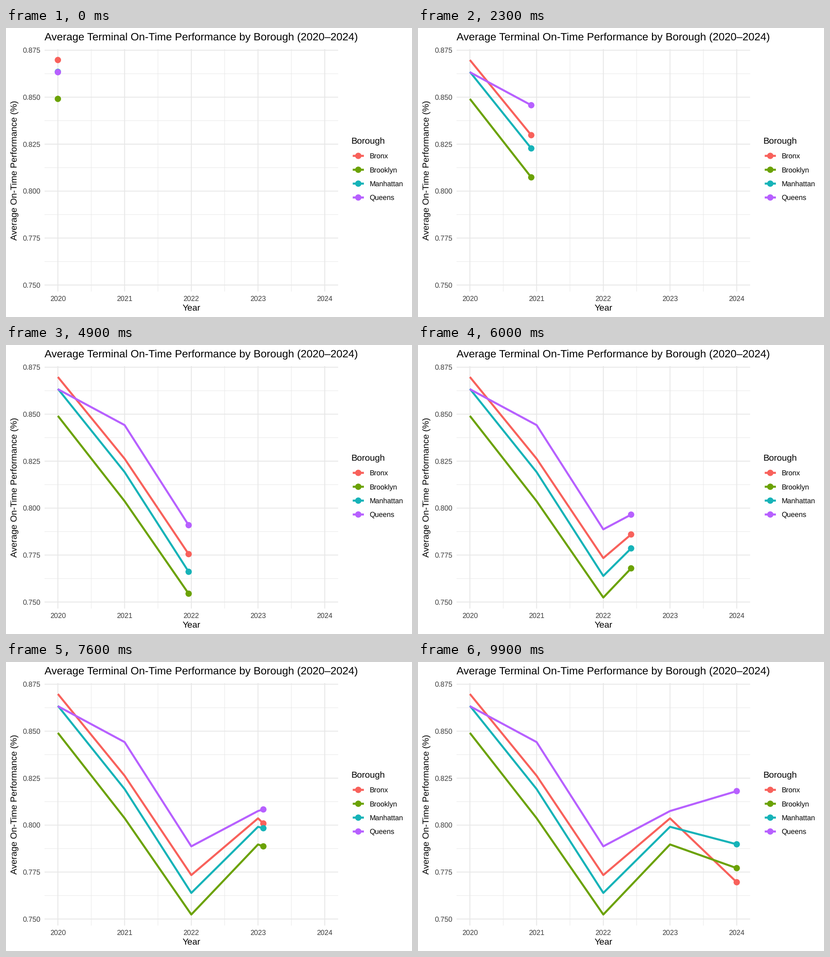
A matplotlib script for the animation above (10000 ms loop, 885 px wide and 632 px high).

```python
import numpy as np
import matplotlib.pyplot as plt
from matplotlib.animation import FuncAnimation
from matplotlib.patches import Circle

W, H, DPI = 885, 632, 100
FRAMES, INTERVAL = 100, 100
PX = 72 / DPI  # points per pixel
BASE = 14      # base font size in points
LINE, RADIUS = 4.4, 6.9

plt.rcParams.update({
    "font.family": "Liberation Sans",
    "text.hinting": "none",
    "path.snap": False,
})

YEARS = np.arange(2020, 2025)
KEYS = [0, 25, 50, 74, 99]  # frame at which each year is reached
LEFT, RIGHT, TOP, BOTTOM = 84, 724, 46, 576.3

# name: (colour, yearly values)
SERIES = {
    "Bronx": ("#F8615B", [0.8698, 0.8263, 0.7734, 0.8036, 0.7696]),
    "Brooklyn": ("#6BA204", [0.8491, 0.8037, 0.7524, 0.7897, 0.7771]),
    "Manhattan": ("#16B3B8", [0.8635, 0.8192, 0.7639, 0.7991, 0.7898]),
    "Queens": ("#B760FF", [0.8633, 0.8442, 0.7887, 0.8075, 0.8181]),
}


def px(year):
    return 113.1 + 145.42 * (np.asarray(year) - 2020)


def py(value):
    return 48.6 + 4108 * (0.875 - np.asarray(value))


fig = plt.figure(figsize=(W / DPI, H / DPI), dpi=DPI, facecolor="white")
ax = fig.add_axes([0, 0, 1, 1])
ax.set_xlim(0, W)
ax.set_ylim(H, 0)
ax.axis("off")


def stroke(x, y, color, width, z):
    return ax.plot(x, y, color=color, lw=width * PX, zorder=z,
                   solid_capstyle="butt", solid_joinstyle="round")[0]


def dot(x, y, color, z):
    return ax.add_patch(Circle((x, y), RADIUS, fc=color, lw=0, zorder=z))


def label(x, y, text, scale=1.0, color="black", ha="left", **kw):
    ax.text(x, y, text, fontsize=BASE * scale, color=color, ha=ha,
            va="baseline", **kw)


def grid(years, values, width, z):
    for v in values:
        stroke([LEFT, RIGHT], [py(v)] * 2, "#E7E7E7", width, z)
    for yr in years:
        stroke([px(yr)] * 2, [TOP, BOTTOM], "#E7E7E7", width, z)


ticks = 0.75 + 0.025 * np.arange(6)
grid(YEARS[:-1] + 0.5, ticks[:-1] + 0.0125, 0.95, 1)
grid(YEARS, ticks, 1.89, 2)

for v in ticks:
    label(75.2, py(v) + 5.6, f"{v:.3f}", 0.8, "#3D3D3D", "right")
for yr in YEARS:
    label(px(yr), 596.6, str(yr), 0.8, "#3D3D3D", "center")

label(83.9, 27.3, "Average Terminal On-Time Performance by Borough (2020–2024)", 1.2)
label(403.9, 618.3, "Year", ha="center")
label(24, 311.2, "Average On-Time Performance (%)", ha="center",
      rotation=90, rotation_mode="anchor")

label(752.6, 253, "Borough")
lines, dots = [], []
for i, (name, (color, _)) in enumerate(SERIES.items()):
    y = 279.6 + 30.35 * i
    stroke([755.8, 780.1], [y, y], color, LINE, 3)
    dot(767.9, y, color, 4)
    label(792.5, y + 5.6, name, 0.8)
    lines.append(stroke([], [], color, LINE, 5 + 0.1 * i))
    dots.append(dot(0, 0, color, 6 + 0.1 * i))


def update(frame):
    now = np.interp(frame, KEYS, YEARS)
    xs = np.append(YEARS[YEARS < now], now)
    for line, point, (_, values) in zip(lines, dots, SERIES.values()):
        ys = np.interp(xs, YEARS, values)
        line.set_data(px(xs), py(ys))
        point.center = px(now), py(ys[-1])
    return lines + dots


anim = FuncAnimation(fig, update, frames=FRAMES, interval=INTERVAL,
                     init_func=lambda: update(0), repeat=True, repeat_delay=0)
plt.show()
```
